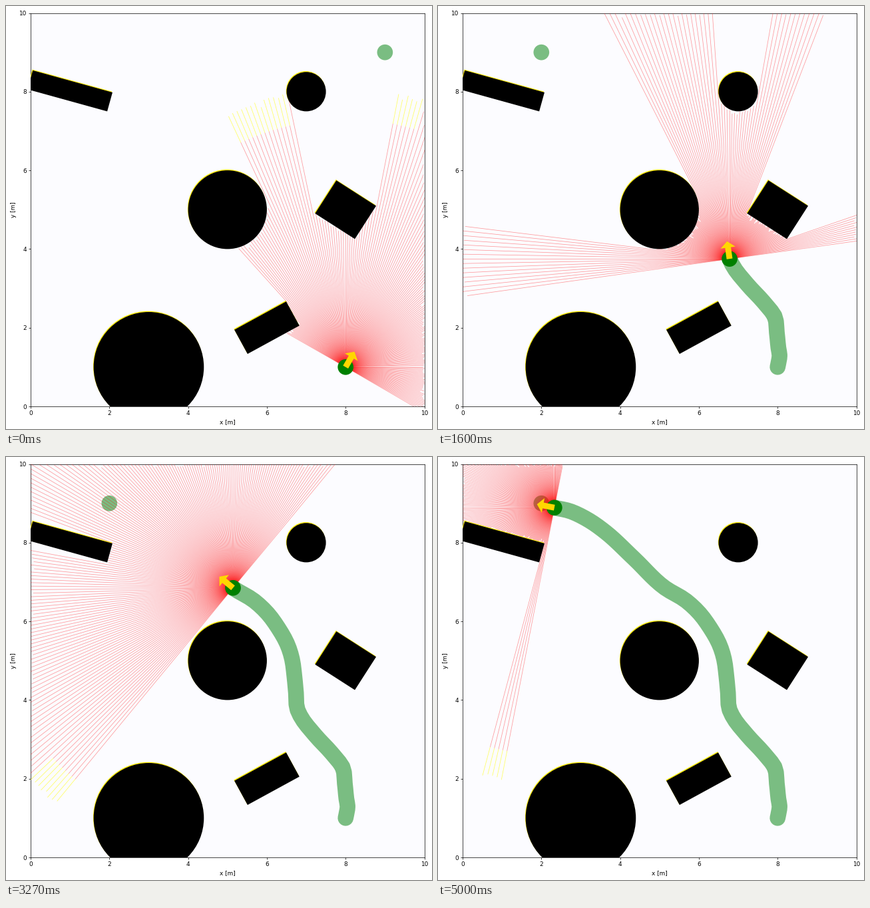
A matplotlib script that plays this animation: 640x636 px, repeating every 5070 ms.

```python
import numpy as np
import matplotlib.pyplot as plt
from matplotlib.animation import FuncAnimation
from matplotlib.collections import LineCollection
from matplotlib.patches import Circle, FancyArrow, Rectangle
from matplotlib.transforms import ScaledTranslation

DPI = 64
SCALE = 59.15                 # pixels per metre
LOOP, INTERVAL = 5070, 30
RATE = 15                     # simulation steps per second
STEPS = 76
RADIUS = 0.2
MAX_RANGE, NOISE = 7.05, 0.045
FAR = 6.3                     # beams without a hit turn yellow from here

# step, x, y, heading in degrees
ROUTE = np.array([
    (0, 8.00, 1.00, 60), (2, 8.03, 1.15, 70), (4, 8.05, 1.30, 88),
    (6, 8.02, 1.49, 97), (9, 7.98, 1.88, 94), (12, 7.92, 2.30, 108),
    (14, 7.74, 2.54, 127), (16, 7.54, 2.77, 132), (18, 7.33, 2.99, 132),
    (20, 7.13, 3.22, 129), (22, 6.93, 3.47, 114), (24, 6.78, 3.75, 98),
    (27, 6.74, 4.18, 95), (30, 6.70, 4.60, 97), (33, 6.64, 5.04, 107),
    (36, 6.51, 5.44, 127), (39, 6.29, 5.83, 129), (42, 6.02, 6.20, 134),
    (45, 5.68, 6.52, 142), (49, 5.14, 6.85, 140.5), (56, 4.36, 7.59, 137),
    (63, 3.64, 8.26, 141), (67, 3.22, 8.56, 149), (71, 2.76, 8.79, 161),
    (75, 2.33, 8.89, 169),
])

CIRCLES = [(5, 5, 1.0), (7, 8, 0.5), (3, 1, 1.4)]
# centre x, centre y, width, height, rotation in radians
BOXES = [(8, 5, 1.0, 1.2, 1.0), (6, 2, 1.5, 0.7, 0.5), (1, 8.02, 2.1, 0.5, -0.27)]


def spline(knots, values, t):
    """Cubic Hermite curve through the values."""
    slope = np.gradient(values, knots, axis=0)
    i = np.clip(np.searchsorted(knots, t, side="right") - 1, 0, len(knots) - 2)
    h = (knots[i + 1] - knots[i])[:, None]
    u = (t - knots[i])[:, None] / h
    return ((1 + 2 * u) * (1 - u) ** 2 * values[i] + u * (1 - u) ** 2 * h * slope[i]
            + u * u * (3 - 2 * u) * values[i + 1] + u * u * (u - 1) * h * slope[i + 1])


def hit_circle(pos, rays, x, y, r):
    rel = pos - (x, y)
    b = rays @ rel
    disc = b * b - (rel @ rel - r * r)
    dist = -b - np.sqrt(np.maximum(disc, 0))
    return np.where((disc > 0) & (dist > 0), dist, np.inf)


def slabs(pos, rays, half):
    """Entry and exit distance for a box centred on the origin."""
    rays = np.where(np.abs(rays) < 1e-9, 1e-9, rays)
    a, b = (-half - pos) / rays, (half - pos) / rays
    return np.minimum(a, b).max(axis=1), np.maximum(a, b).min(axis=1)


def hit_box(pos, rays, x, y, w, h, rot):
    c, s = np.cos(rot), np.sin(rot)
    turn = np.array([(c, -s), (s, c)])
    near, far = slabs((pos - (x, y)) @ turn, rays @ turn, np.array([w, h]) / 2)
    return np.where((near < far) & (near > 0), near, np.inf)


def scan(step):
    """Beam directions, measured distances and whether each beam hit something."""
    x, y, heading = poses[step]
    pos = np.array([x, y])
    angle = np.radians(heading + np.linspace(-90, 90, 181))
    rays = np.column_stack([np.cos(angle), np.sin(angle)])
    dist = slabs(pos - 5, rays, np.array([5.0, 5.0]))[1]
    for c in CIRCLES:
        dist = np.minimum(dist, hit_circle(pos, rays, *c))
    for b in BOXES:
        dist = np.minimum(dist, hit_box(pos, rays, *b))
    hit = dist < MAX_RANGE
    noise = np.random.default_rng(step).normal(0, NOISE, len(dist))
    return pos, rays, np.minimum(dist, MAX_RANGE) + noise, hit


def segments(pos, rays, start, end):
    return np.stack([pos + rays * start[:, None], pos + rays * end[:, None]], axis=1)


def obstacles(**style):
    for x, y, r in CIRCLES:
        yield Circle((x, y), r, lw=0, **style)
    for x, y, w, h, rot in BOXES:
        yield Rectangle((x - w / 2, y - h / 2), w, h, angle=np.degrees(rot),
                        rotation_point="center", lw=0, **style)


poses = spline(ROUTE[:, 0], ROUTE[:, 1:], np.arange(STEPS))

fig = plt.figure(figsize=(640 / DPI, 636 / DPI), dpi=DPI, facecolor="white")
ax = fig.add_axes([37 / 640, 34 / 636, 591.5 / 640, 591.5 / 636], facecolor="#fcfcff")
ax.set(xlim=(0, 10), ylim=(0, 10), xlabel="x [m]", ylabel="y [m]")

# thin yellow rim on the upper left of each obstacle
shift = ScaledTranslation(-0.7 / DPI, 1.3 / DPI, fig.dpi_scale_trans)
for rim in obstacles(color="#ffee00", zorder=4):
    ax.add_patch(rim)
    rim.set_transform(ax.transData + shift)
for body in obstacles(color="black", zorder=5):
    ax.add_patch(body)

goal = ax.add_patch(Circle((9, 9), RADIUS, fc="#7abd82", lw=0, zorder=1))
trail, = ax.plot([], [], color="#7abd82", lw=2 * RADIUS * SCALE * 72 / DPI,
                 solid_capstyle="round", solid_joinstyle="round", zorder=2)
beams = ax.add_collection(
    LineCollection([], colors="red", alpha=0.38, linewidths=0.9, zorder=3), autolim=False)
tips = ax.add_collection(
    LineCollection([], colors="#ffff30", alpha=0.75, linewidths=0.9, zorder=3), autolim=False)
robot = ax.add_patch(Circle((8, 1), RADIUS, fc="green", lw=0, zorder=6))
arrow = ax.add_patch(FancyArrow(
    8, 1, 0.2, 0.4, width=0.15, head_width=0.38, head_length=0.16,
    length_includes_head=True, fc="gold", lw=0, zorder=7))


def draw(i):
    step = min((i * INTERVAL + 20) * RATE // 1000, STEPS - 1)
    pos, rays, dist, hit = scan(step)
    heading = np.radians(poses[step, 2])

    split = np.where(hit, dist, FAR)
    beams.set_segments(segments(pos, rays, np.zeros_like(dist), split))
    tips.set_segments(segments(pos, rays[~hit], split[~hit], dist[~hit]))

    path = poses[:step + 1, :2] if step else np.empty((0, 2))
    trail.set_data(path[:, 0], path[:, 1])
    goal.center = (2, 9) if step else (9, 9)
    robot.center = pos
    arrow.set_data(x=pos[0], y=pos[1],
                   dx=0.45 * np.cos(heading), dy=0.45 * np.sin(heading))
    return goal, trail, beams, tips, robot, arrow


anim = FuncAnimation(fig, draw, frames=LOOP // INTERVAL, interval=INTERVAL, repeat=True)
plt.show()
```
